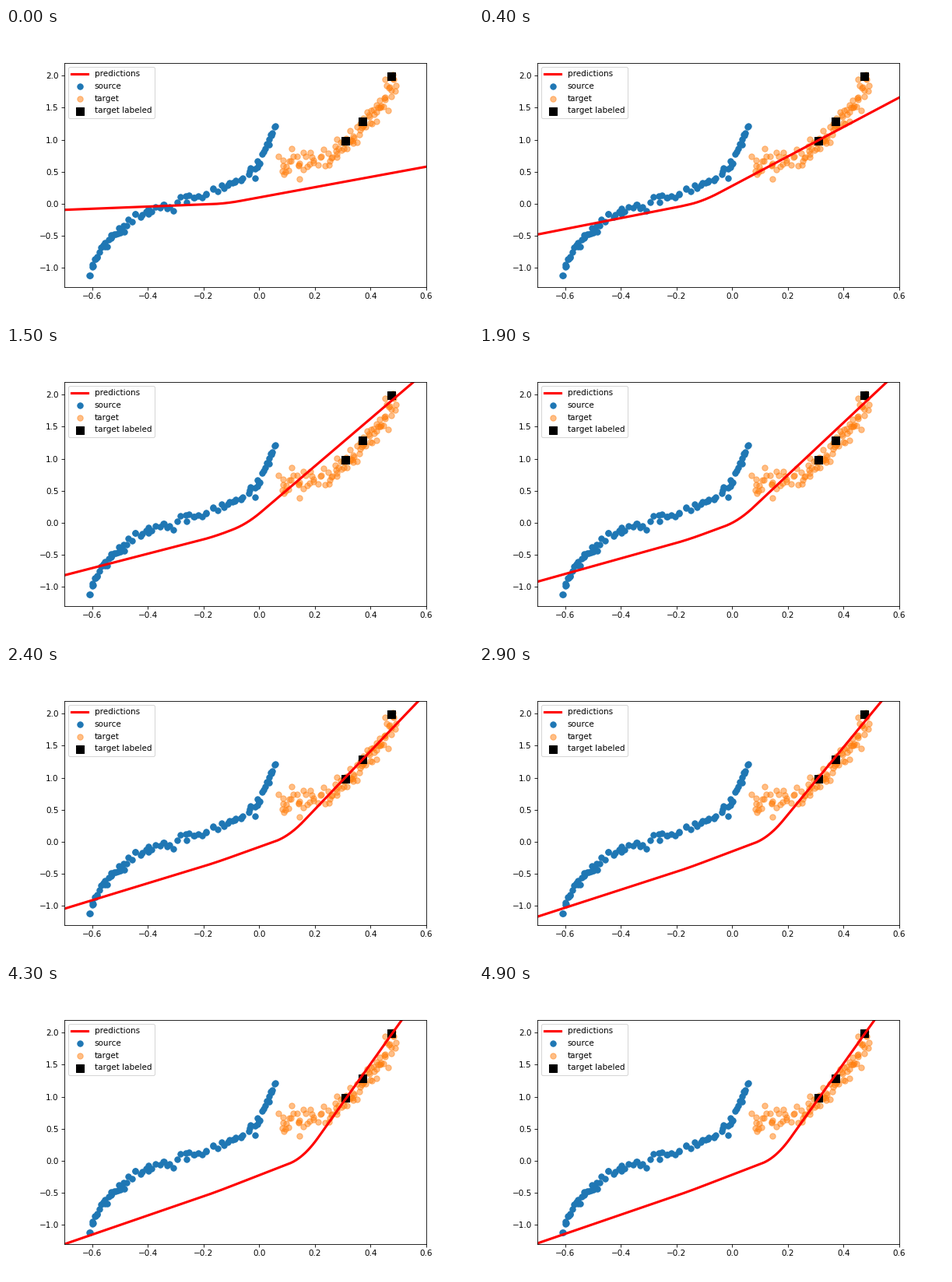
Recreate the animation shown at these times as a matplotlib script. Size 600 by 374 pixels, loop 5000 ms.

```python
import numpy as np
import matplotlib.pyplot as plt
from matplotlib.animation import FuncAnimation

DPI = 75
WIDTH, HEIGHT = 600, 374
FRAMES, INTERVAL = 50, 100
X_RANGE, Y_RANGE = (-0.7, 0.6), (-1.3, 2.2)
GRID = np.linspace(*X_RANGE, 300)
SMOOTHING = np.linspace(-0.05, 0.05, 31)

plt.rcParams["font.family"] = "DejaVu Sans"
rng = np.random.default_rng(4)

# Centre lines that the two noisy samples follow.
SOURCE_PATH = [(-.61, -1.12), (-.575, -.75), (-.53, -.53), (-.48, -.34),
               (-.4, -.15), (-.3, .03), (-.2, .14), (-.1, .32),
               (-.02, .5), (.02, .8), (.06, 1.24)]
TARGET_PATH = [(.07, .56), (.15, .62), (.25, .76), (.32, .97),
               (.38, 1.2), (.44, 1.6), (.49, 2.0)]
LABELED = [(.308, .985), (.3695, 1.285), (.474, 1.99)]

# The fit is three straight pieces, rounded at the joints, that change in training.
STEPS = [0, 4, 9, 15, 24, 35, 49]
FIT = {
    "left_y": [-.095, -.48, -.72, -.82, -1.046, -1.32, -1.29],
    "bend_y": [-.004, -.02, -.04, -.215, -.33, -.51, -.485],
    "kink_x": [-.12, -.1, -.072, -.044, .107, .161, .158],
    "kink_y": [.003, .05, .099, -.02, .084, .041, .045],
    "slope": [.8, 2.3, 3.43, 3.71, 4.55, 6.13, 6.1],
}
LEFT_X, BEND_X = -0.7, -0.16


def sample_along(path, count, spread):
    path = np.array(path)
    position = np.linspace(0, len(path) - 1, count) + rng.normal(0, 0.06, count)
    x, y = (np.interp(position, range(len(path)), axis) for axis in path.T)
    return x, y + rng.normal(0, spread, count)


def predictions(step):
    p = {name: np.interp(step, STEPS, values) for name, values in FIT.items()}
    left_slope = (p["bend_y"] - p["left_y"]) / (BEND_X - LEFT_X)
    x = [LEFT_X - 1, BEND_X, p["kink_x"], p["kink_x"] + 1]
    y = [p["left_y"] - left_slope, p["bend_y"], p["kink_y"], p["kink_y"] + p["slope"]]
    return np.mean([np.interp(GRID + d, x, y) for d in SMOOTHING], axis=0)


fig, ax = plt.subplots(figsize=(WIDTH / DPI, HEIGHT / DPI), dpi=DPI)
fig.subplots_adjust(left=0.125, right=0.9, bottom=0.11, top=0.88)
line, = ax.plot(GRID, predictions(0), color="red", lw=3, label="predictions")
ax.scatter(*sample_along(SOURCE_PATH, 92, 0.045), s=50, color="tab:blue", label="source")
ax.scatter(*sample_along(TARGET_PATH, 98, 0.1), s=50, color="tab:orange",
           alpha=0.5, label="target")
ax.scatter(*zip(*LABELED), color="black", marker="s", s=100, label="target labeled")
ax.set_xlim(X_RANGE)
ax.set_ylim(Y_RANGE)
ax.legend(loc="upper left", labelspacing=0.55)


def update(step):
    line.set_ydata(predictions(step))
    return line,


anim = FuncAnimation(fig, update, frames=FRAMES, interval=INTERVAL, repeat=True)
plt.show()
```
